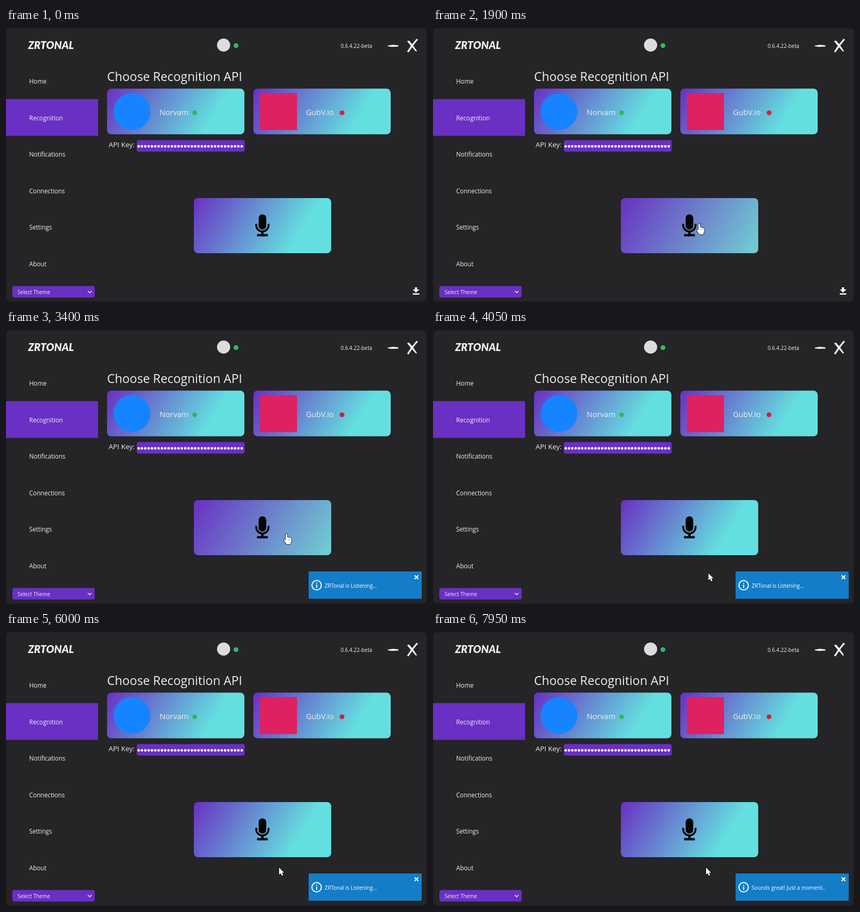
Recreate the animation shown at these times as an HTML page with a canvas. Size 800 px wide and 522 px high, loop 8000 ms.

```html
<!DOCTYPE html>
<html lang="en">
<head>
<meta charset="utf-8">
<title>Recognition settings</title>
<style>
html, body { margin: 0; width: 100%; height: 100%; overflow: hidden; background: #252426; }
canvas { display: block; width: 800px; height: 522px; }
</style>
</head>
<body>
<canvas id="stage" width="800" height="522"></canvas>
<script>
const LOOP = 8000, STEP = 50;
const PURPLE = '#6930c3', CYAN = '#64dfdf', INK = '#f0eff1';
const FONT = '"Open Sans", "Noto Sans", sans-serif';
const ctx = document.getElementById('stage').getContext('2d');

const clamp = v => Math.max(0, Math.min(1, v));
const ease = v => v * v * (3 - 2 * v);

function text(str, x, y, size, color = INK, font = FONT, style = '') {
  ctx.font = `${style} ${size}px ${font}`;
  ctx.fillStyle = color;
  ctx.fillText(str, x, y);
}

function box(x, y, w, h, r, fill) {
  ctx.beginPath();
  ctx.roundRect(x, y, w, h, r);
  ctx.fillStyle = fill;
  ctx.fill();
}

function dot(x, y, r, fill) {
  ctx.beginPath();
  ctx.arc(x, y, r, 0, Math.PI * 2);
  ctx.fillStyle = fill;
  ctx.fill();
}

function poly(points, fill) {
  ctx.beginPath();
  points.forEach(([x, y]) => ctx.lineTo(x, y));
  ctx.closePath();
  ctx.fillStyle = fill;
  ctx.fill();
}

function line(points, color, width) {
  ctx.beginPath();
  points.forEach(([x, y], i) => i ? ctx.lineTo(x, y) : ctx.moveTo(x, y));
  ctx.strokeStyle = color;
  ctx.lineWidth = width;
  ctx.stroke();
}

// Slanted purple-to-cyan panel
function panel(x, y, w, h, end = CYAN, stop = 0.75) {
  const dx = 0.85, dy = 0.52, len = w * dx + h * dy;
  const g = ctx.createLinearGradient(x, y, x + dx * len, y + dy * len);
  g.addColorStop(0, PURPLE);
  g.addColorStop(stop, end);
  box(x, y, w, h, 8, g);
}

function header() {
  text('ZRTONAL', 42, 40, 20, INK, 'Lato, sans-serif', 'italic 900');
  dot(413.5, 32.5, 12.5, '#dcdcdc');
  dot(437, 33.5, 4.6, '#35b765');
  text('0.6.4.22-beta', 636, 38, 9.9);
  poly([[725, 33.5], [735, 32], [746, 33], [745, 35.5], [733, 36], [726, 35]], INK);
  poly([[762, 25], [766, 24], [773, 32], [781, 44], [779, 45], [770, 35]], INK);
  poly([[780, 20.5], [783, 22], [774, 33], [765, 46.5], [762, 45], [770, 33]], INK);
}

function sidebar() {
  box(0, 135.5, 175, 70, 0, PURPLE);
  ['Home', 'Recognition', 'Notifications', 'Connections', 'Settings', 'About']
    .forEach((label, i) => text(label, 44, 106 + i * 69.5, 11.7));
  box(12, 491.5, 156.5, 22, 4, PURPLE);
  text('Select Theme', 22, 506.5, 9.95);
  line([[155.5, 501], [159, 504.5], [162.5, 501]], INK, 1.4);
}

function download() {
  poly([[777, 494], [781, 494], [781, 498], [785.5, 498], [779, 504], [773, 498], [777, 498]], '#fff');
  box(773, 505.5, 12.5, 2.5, 0, '#fff');
}

function content() {
  text('Choose Recognition API', 192, 101, 23.3);
  panel(192, 115.5, 261, 87);
  dot(239.5, 159, 35, '#1684ff');
  text('Norvam', 292, 166, 14.6);
  dot(358.5, 161.5, 4.2, '#2fb552');
  panel(470, 115.5, 261, 87);
  box(482.5, 124, 70.5, 70.5, 0, '#de2160');
  text('GubV.io', 570, 166, 14.6);
  dot(638.5, 161.5, 4.6, '#cf2145');
  text('API Key:', 195, 227, 13.4);
  box(248.5, 213.5, 205, 22, 4, PURPLE);
  for (let i = 0; i < 32; i++) dot(252 + i * 6.32, 225.5, 2.4, '#fff');
}

function listenButton(hover) {
  if (hover) panel(357, 324, 261, 105, '#70d0d2', 1);
  else panel(357, 324, 261, 105);
  box(480, 355, 14.5, 29, 7.2, '#050505');
  ctx.beginPath();
  ctx.moveTo(475.5, 373);
  ctx.lineTo(475.5, 376);
  ctx.arc(487.2, 376, 11.7, Math.PI, 0, true);
  ctx.lineTo(498.9, 373);
  ctx.strokeStyle = '#050505';
  ctx.lineWidth = 3.5;
  ctx.stroke();
  box(485, 386, 4.5, 8, 0, '#050505');
  box(477, 392.5, 20.5, 4.5, 1, '#050505');
}

function toast(message, scale, cy) {
  if (scale <= 0) return;
  ctx.save();
  ctx.globalAlpha = Math.pow(scale, 0.7);
  ctx.translate(682.5, cy);
  ctx.scale(scale, scale);
  ctx.translate(-682.5, -486);
  box(575, 460, 215, 52, 0, '#147dc8');
  ctx.beginPath();
  ctx.arc(590.3, 486.3, 9, 0, Math.PI * 2);
  ctx.strokeStyle = '#fff';
  ctx.lineWidth = 2;
  ctx.stroke();
  box(589.3, 485, 2, 6.5, 0, '#fff');
  box(589.3, 481.5, 2, 2, 0, '#fff');
  text(message, 605.5, 490.5, 10, '#fff');
  line([[776.5, 467.5], [783.5, 474.5]], '#fff', 2);
  line([[783.5, 467.5], [776.5, 474.5]], '#fff', 2);
  ctx.restore();
}

function toasts(t) {
  toast('Sounds great! Just a moment..', clamp((t - 6800) / 330), 486);
  const scale = Math.min(clamp((t - 2100) / 330), 1 - clamp((t - 6750) / 290));
  // Closing collapses onto the bottom edge
  toast('ZRTonal is Listening...', scale, t > 6000 ? 512 - 26 * scale : 486);
}

// Pointer tip: time, x, y
const PATH = [
  [450, 530, 508], [900, 506, 373], [1900, 506, 373], [2100, 506, 374],
  [2850, 506, 374], [3350, 533, 388], [3450, 533, 388],
  [3750, 529, 478], [3900, 528, 478], [4200, 519, 449], [LOOP, 519, 449]
];

function pointerAt(t) {
  if (t < PATH[0][0]) return null;
  const i = PATH.findIndex(k => k[0] > t);
  const a = PATH[i - 1], b = PATH[i];
  const p = ease((t - a[0]) / (b[0] - a[0]));
  return [a[1] + (b[1] - a[1]) * p, a[2] + (b[2] - a[2]) * p];
}

const ARROW = new Path2D('M0 0V13.2L3 10.4L5.2 15.2L7.6 14.1L5.4 9.5H9.4Z');
const HAND = new Path2D('M-1.5 1.5Q-1.5 0 0 0Q1.5 0 1.5 1.5V6.5L7.5 8Q9.5 8.5 9.5 10.5V14L7.5 20H0L-4.5 13Q-5.5 11 -3.8 10.6L-1.5 12.5Z');

function pointer([x, y], hand) {
  const shape = hand ? HAND : ARROW;
  ctx.save();
  ctx.translate(x, y);
  ctx.strokeStyle = '#161616';
  ctx.lineWidth = 1.6;
  ctx.stroke(shape);
  ctx.fillStyle = '#fff';
  ctx.fill(shape);
  if (hand) {
    line([[3.8, 9.5], [3.8, 12]], '#555', 0.7);
    line([[6.5, 10], [6.5, 12.5]], '#555', 0.7);
  }
  ctx.restore();
}

function draw(t) {
  const tip = pointerAt(t);
  const hover = !!tip && tip[0] > 357 && tip[0] < 618 && tip[1] > 324 && tip[1] < 429;
  box(0, 0, 800, 522, 0, '#19191a');
  box(0.5, 0.5, 799, 520.5, 7, '#252426');
  header();
  sidebar();
  content();
  listenButton(hover);
  download();
  toasts(t);
  if (tip) pointer(tip, hover);
}

const start = performance.now();
function tick() {
  const t = (performance.now() - start) % LOOP;
  draw(Math.floor(t / STEP) * STEP);
  requestAnimationFrame(tick);
}
tick();
</script>
</body>
</html>
```
